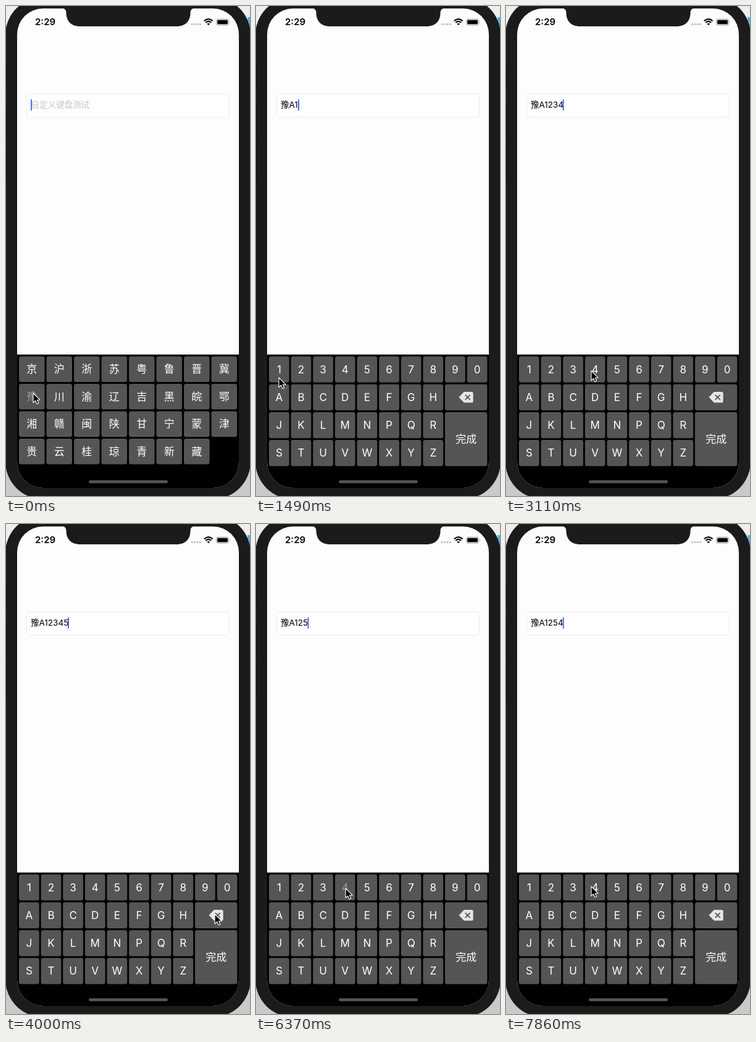
Write an HTML page that moves like this. It is 395 by 795 pixels and loops after 8 s.

```html
<!DOCTYPE html>
<html lang="zh-CN">
<head>
<meta charset="utf-8">
<style>
  html, body { margin: 0; width: 100%; height: 100%; overflow: hidden; background: #d4d4d4; }
  svg { display: block; width: 395px; height: 795px; }
  text { font-family: Inter, "Noto Sans CJK SC", "Noto Sans CJK", sans-serif; }
  .key rect { fill: #555; }
  .key text { fill: #fff; font-size: 17px; text-anchor: middle; }
  .pressed text, .pressed .icon { opacity: .4; }
</style>
</head>
<body>
<svg viewBox="0 0 395 795">
  <defs>
    <linearGradient id="desk" x2="0" y2="1">
      <stop offset="0" stop-color="#eee"/>
      <stop offset="1" stop-color="#c9c9c9"/>
    </linearGradient>
    <clipPath id="screen"><rect x="18" y="4" width="359" height="778" rx="42"/></clipPath>
  </defs>
  <rect width="395" height="795" fill="url(#desk)"/>
  <rect x="391" y="18" width="4" height="62" fill="#58b4dd"/>
  <rect x="-1" y="-14" width="397" height="814" rx="61" fill="#1b1b1b"/>
  <path d="M.5 98v34M.5 160v58M.5 225v58" stroke="#0c0c0c"/>

  <g clip-path="url(#screen)">
    <rect x="18" y="4" width="359" height="778" fill="#fdfdfd"/>
    <rect x="18" y="565.5" width="359" height="220"/>
  </g>
  <path d="M90 3Q97.500 4 97.500 11C97.500 24 105 33 120 33H276C291 33 298.500 24 298.500 11Q298.500 4 306 3Z" fill="#1b1b1b"/>

  <text x="47" y="31.300" font-size="15" font-weight="600">2:29</text>
  <g fill="#bdbdbd">
    <circle cx="301.300" cy="29.500" r="1.600"/><circle cx="305.700" cy="29.500" r="1.600"/>
    <circle cx="310.100" cy="29.500" r="1.600"/><circle cx="314.500" cy="29.500" r="1.600"/>
  </g>
  <g fill="none" stroke="#000" stroke-width="2.200">
    <path d="M320.800 24.300Q327.700 17.800 334.600 24.300M323.300 27Q327.700 22.900 332.100 27"/>
    <path d="M327.700 31.300L325.400 28.900Q327.700 27 330 28.900Z" fill="#000" stroke="none"/>
  </g>
  <rect x="340.500" y="21.300" width="20" height="9.800" rx="2.600" fill="none" stroke="#999"/>
  <rect x="342" y="22.800" width="17" height="6.800" rx="1.400"/>
  <path d="M361.800 24.500q1.500 1.700 0 3.400z" fill="#999"/>

  <rect x="33.500" y="142.500" width="328" height="38" rx="5" fill="#fff" stroke="#ebebeb"/>
  <text id="hint" x="40.500" y="165.200" font-size="13.500" fill="#c5c5c7">自定义键盘测试</text>
  <text id="value" x="40" y="165.200" font-size="13.500"></text>
  <rect id="caret" y="151.500" width="2" height="18" fill="#4a6fe8"/>

  <g id="provinces"></g>
  <g id="letters"></g>
  <rect x="134" y="769.500" width="128" height="4.800" rx="2.400" fill="#555"/>
  <path id="pointer" d="M0 0V15.500L3.600 12.300L6 17.700L8.700 16.500L6.400 11.300H11.300Z" stroke="#fff" stroke-width="1.100" stroke-linejoin="round"/>
</svg>
<script>
const $ = id => document.getElementById(id);
const LOOP = 8000, STEP = LOOP / 54;
const keys = {};

function addKey(board, label, x, y, w, h) {
  const g = document.createElementNS('http://www.w3.org/2000/svg', 'g');
  g.setAttribute('class', 'key');
  const cx = x + w / 2, cy = y + h / 2;
  const face = label === 'del'
    ? `<g class="icon"><path d="M328.500 634.800L335.800 627Q336.700 626 338 626H349Q351.600 626 351.600 628.600V641Q351.600 643.600 349 643.600H338Q336.700 643.600 335.800 642.600Z" fill="#e6e6e6"/>
       <path d="M338.700 630.800l8 8m0-8l-8 8" stroke="#505050" stroke-width="1.700"/></g>`
    : `<text x="${cx}" y="${cy + 6.2}">${label}</text>`;
  g.innerHTML = `<rect x="${x}" y="${y}" width="${w}" height="${h}" rx="3.500"/>${face}`;
  board.append(g);
  keys[label] = g;
}

function addRows(board, rows, pitchX, pitchY, w, h) {
  rows.forEach((row, r) => [...row].forEach((label, c) =>
    addKey(board, label, 21 + c * pitchX, 568.5 + r * pitchY, w, h)));
}

addRows($('provinces'), ['京沪浙苏粤鲁晋冀', '豫川渝辽吉黑皖鄂', '湘赣闽陕甘宁蒙津', '贵云桂琼青新藏'], 44.5, 44.5, 41.5, 41.5);
addRows($('letters'), ['1234567890', 'ABCDEFGH', 'JKLMNPQR', 'STUVWXYZ'], 35.63, 45.2, 32.7, 42.3);
addKey($('letters'), 'del', 306, 613.7, 68.3, 42.3);
addKey($('letters'), '完成', 306, 658.9, 68.3, 87.5);

// [step, value]
const typed = [[0, ''], [3, '豫'], [6, '豫A'], [10, '豫A1'], [14, '豫A12'], [17, '豫A123'], [21, '豫A1234'],
  [24, '豫A12345'], [29, '豫A1234'], [32, '豫A123'], [35, '豫A12'], [40, '豫A125'], [45, '豫A1254']];
const caretX = [40, 53, 62, 68, 75.2, 83.4, 91.8, 100];

// [first step, last step, key]
const presses = [[0, 2, '豫'], [5, 5, 'A'], [9, 9, '1'], [13, 13, '2'], [16, 16, '3'], [20, 20, '4'],
  [23, 23, '5'], [28, 28, 'del'], [39, 39, '5'], [43, 44, '4']];

// [step, x, y]
const path = [[0, 44, 628], [3, 44, 628], [4, 48, 620], [6, 48, 620], [8, 38, 601], [10, 37, 603], [12, 62, 595],
  [14, 72, 592], [15, 98, 591], [17, 100, 592], [18, 129, 592], [19, 137, 592], [21, 138, 592], [22, 168, 592],
  [24, 174, 592], [26, 298, 628], [27, 338, 633], [34, 338, 633], [35, 273, 638], [37, 176, 592], [40, 174, 592],
  [42, 146, 591], [43, 145, 591], [46, 145, 591], [47, 170, 600], [49, 293, 638], [50, 293, 638], [52, 150, 592],
  [53, 138, 588]];

function pointerAt(step) {
  const i = path.findIndex(p => p[0] >= step);
  const b = path[i], a = path[Math.max(0, i - 1)];
  const f = b[0] === a[0] ? 0 : (step - a[0]) / (b[0] - a[0]);
  return [1, 2].map(n => a[n] + (b[n] - a[n]) * f);
}

function draw(time) {
  const step = Math.min(53, Math.floor((time % LOOP + 8) / STEP));
  const value = typed.filter(t => t[0] <= step).pop()[1];
  $('value').textContent = value;
  $('hint').style.display = value ? 'none' : '';
  $('caret').setAttribute('x', caretX[value.length]);
  $('caret').style.display = step === 49 || step === 50 ? 'none' : '';
  $('provinces').style.display = step < 3 ? '' : 'none';
  $('letters').style.display = step < 3 ? 'none' : '';
  const down = presses.find(p => step >= p[0] && step <= p[1]);
  for (const label in keys) keys[label].classList.toggle('pressed', !!down && down[2] === label);
  $('pointer').setAttribute('transform', `translate(${pointerAt(step)})`);
}

let start;
function tick(now) {
  start ??= now;
  draw(now - start);
  requestAnimationFrame(tick);
}
draw(0);
requestAnimationFrame(tick);
</script>
</body>
</html>
```
